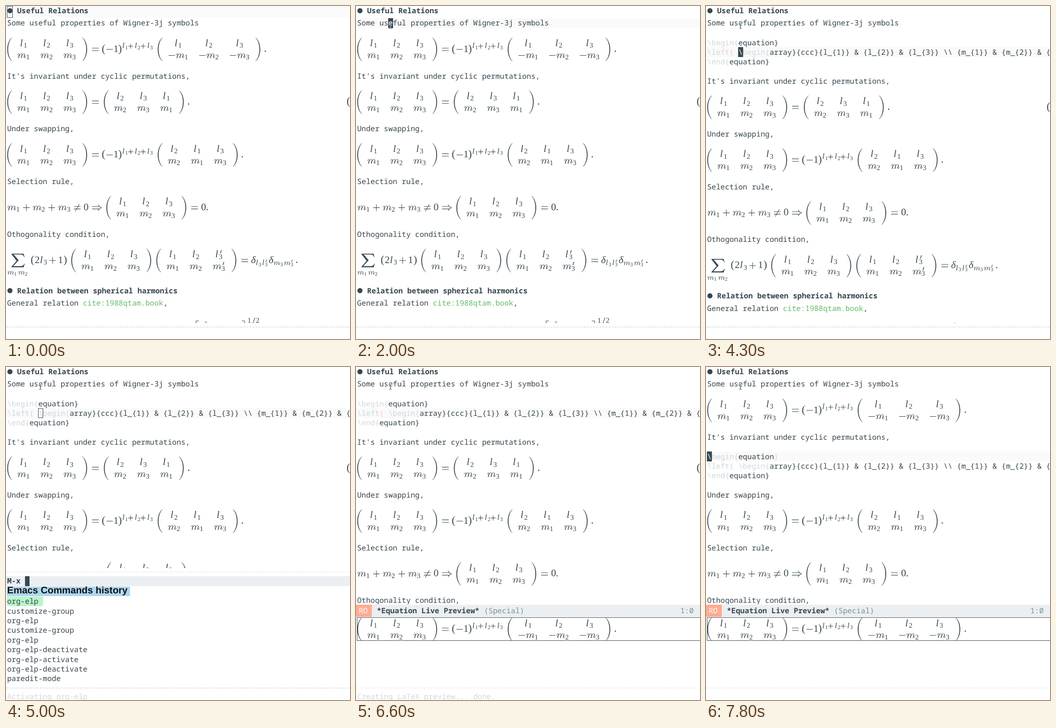
An HTML page that plays this animation: 760x737 px, repeating every 8000 ms.

```html
<!DOCTYPE html>
<html lang="en">
<head>
<meta charset="utf-8">
<title>Equation live preview</title>
<style>
html, body { margin: 0; width: 100%; height: 100%; overflow: hidden; background: #fff; }
svg { display: block; width: 760px; height: 737px; }
text { font: 400 16.43px "Noto Sans Mono", "DejaVu Sans Mono", monospace; fill: #37474f; white-space: pre; text-rendering: geometricPrecision; }
.bold { font-weight: 600; }
.light { font-weight: 300; }
.dim { fill: #cfd8dc; font-weight: 300; }
.grey { fill: #78909c; font-weight: 300; }
.green { fill: #66bb6a; font-weight: 300; }
.match { fill: #ffc4b3; }
.inv { fill: #fff; }
.title { font: 700 21.2px "Liberation Sans", Arial, sans-serif; fill: #111; }
.rm { font-family: "Liberation Serif", "Times New Roman", serif; }
.it { font-family: "Liberation Serif", "Times New Roman", serif; font-style: italic; }
.rule { fill: none; stroke: #37474f; stroke-width: 1.1; }
.m { fill: none; stroke: #37474f; stroke-linecap: round; }
</style>
</head>
<body>
<svg id="stage" viewBox="0 0 760 737"></svg>
<script>
const INK = '#37474f', LOOP = 8000, LEFT = 2.5, ADV = 9.858, LINE = 21.4, GROW = 11.5;
const stage = document.getElementById('stage');

// Basic shapes
const rect = (x, y, w, h, fill) => `<rect x="${x}" y="${y}" width="${w}" height="${h}" fill="${fill}"/>`;
const box = (x, y, w, h) => `<rect class="rule" style="stroke-width:1" x="${x}" y="${y}" width="${w}" height="${h}"/>`;
const line = d => `<path class="rule" d="${d}"/>`;
const shape = d => `<path fill="${INK}" d="${d}"/>`;
const move = (y, body) => `<g transform="translate(0 ${y})">${body}</g>`;
const text = (x, y, s, cls = '') => `<text x="${x}" y="${y}" class="${cls}">${s}</text>`;
const span = (cls, s) => `<tspan class="${cls}">${s}</tspan>`;
// Monospaced line centred on y
const row = (y, s, cls, x = LEFT) => text(x, y + 5.5, s, cls);

// Math parts; y = 0 is the math axis, BASE the baseline
const BASE = 5.5;
const glyph = (cls, size, x, y, s) => `<text class="${cls}" x="${x}" y="${y}" style="font-size:${size}px">${s}</text>`;
const num = (x, s) => glyph('rm', 22, x, BASE, s);
const paren = (x, s) => glyph('rm', 24, x, BASE, s);
const dot = x => `<circle cx="${x}" cy="4.2" r="1.4" fill="${INK}"/>`;
const minus = (x, y = 0) => line(`M${x} ${y}h14`);
const plus = (cx, y = 0, r = 7.3) => line(`M${cx - r} ${y}h${2 * r}M${cx} ${y - r}v${2 * r}`);
const equals = x => line(`M${x} -2.7h15M${x} 2.7h15`);
const prime = (x, y, k = 1) =>
  `<path d="M${x + 2.5 * k} ${y}l${-2.5 * k} ${7 * k}" stroke="${INK}" stroke-width="${1.5 * k}"/>`;

// Wide math italic m: hairlines and heavier stems
const italicM = (x, y, k) => `<g class="m" transform="translate(${x} ${y}) scale(${k})">` +
  '<path stroke-width=".95" d="M.7-6.4C1.4-8.6 2.2-9.4 3.2-9.4S4.8-8.6 4.5-7.2M3.7-4.4C5-7.8 7-9.4 8.8-9.4S11-8.4 10.6-6.6M9.9-4.4C11.2-7.8 13.2-9.4 15-9.4S17.2-8.4 16.6-6.4M15.2-2.2C14.6-.4 15.3-.1 16-.1S17.8-.9 18.6-3.2"/>' +
  '<path stroke-width="1.6" d="M4.5-7.2L2.8-.4M10.6-6.8L9-.4M16.6-6.4L15.2-2"/></g>';

function sym(ch, x, y, sub, k = 1, dash = false) {
  const dx = ch === 'm' ? 19.5 : 8;
  return (ch === 'm' ? italicM(x, y, k) : glyph('it', 22 * k, x, y, ch)) +
    glyph('rm', 15.5 * k, x + dx * k, y + 3.4 * k, sub) +
    (dash ? prime(x + (dx + 3) * k, y - 16 * k, k) : '');
}

// Tall bracket; dir 1 opens right, -1 opens left
function bracket(x, dir) {
  const tip = x + 10 * dir, out = x - 3 * dir, inn = x - 0.7 * dir;
  return shape(`M${tip} -26C${out} -14 ${out} 14 ${tip} 26h${0.8 * dir}C${inn} 14 ${inn} -14 ${tip + 0.8 * dir} -26Z`);
}

function matrix(x, order = [1, 2, 3], { neg = false, dash = false } = {}) {
  const first = neg ? 45 : 36, gap = neg ? 67.7 : 51;
  const cells = order.map((n, i) => {
    const cx = x + first + gap * i, d = dash && i === 2;
    return sym('l', cx - 7.5, -7, n, 1, d) +
      (neg ? minus(cx - 21, 13.5) : '') +
      sym('m', cx - (neg ? 5 : 13.5), 19, n, 1, d);
  });
  return bracket(x, 1) + cells.join('') + bracket(x + (neg ? 227 : 177), -1);
}

const phase = paren(211.5, '(') + minus(222) + num(237.5, '1') + paren(248, ')') +
  [1, 2, 3].map((n, i) => sym('l', 257 + 27.5 * i, -3, n, 0.78)).join('') +
  plus(275.5, -7, 5.3) + plus(303, -7, 5.3);

const flip = matrix(2.5) + equals(190) + phase + matrix(335, [1, 2, 3], { neg: true }) + dot(573);
const cyclic = matrix(2.5) + equals(190) + matrix(216, [2, 3, 1]) + dot(403.5) + paren(752.5, '(');
const swap = matrix(2.5) + equals(190) + phase + matrix(335, [2, 1, 3]) + dot(522);
const select = [1, 2, 3].map((n, i) => sym('m', 3 + 56 * i, BASE, n)).join('') +
  plus(45) + plus(101) + equals(150) + line('M153 8L162 -8') + num(171.5, '0') +
  line('M190 -2.7H207M190 2.7H207M203.5 -7C205 -3 208 -1 211 0C208 1 205 3 203.5 7') +
  matrix(221.5) + equals(409) + num(431, '0') + dot(444.5);
const sum = shape('M12-15H39L41-7H40C39-12 36-13.2 31-13.2H17L28-.5 16 12.5H31C36 12.5 39 11 40.5 7H41.5L39 15H12V14L23.5 .8 12-14Z') +
  sym('m', 3, 31, 1, 0.75) + sym('m', 27, 31, 2, 0.75);
const ortho = sum + paren(54.5, '(') + num(63.5, '2') + sym('l', 75, BASE, 3) + plus(103) +
  num(115, '1') + paren(127, ')') + matrix(144) + matrix(332, [1, 2, 3], { dash: true }) +
  equals(520) + glyph('it', 22, 541.5, BASE, 'δ') + sym('l', 552, 10, 3, 0.75) +
  sym('l', 566, 10, 3, 0.75, true) + glyph('it', 22, 580.5, BASE, 'δ') +
  sym('m', 591, 10, 3, 0.75) + sym('m', 614, 10, 3, 0.75, true) + dot(642.5);
const harmonics = line('M426 697H420V712M521 697H527V712') + glyph('rm', 12, 438, 705.5, '2') +
  glyph('rm', 16, 533.5, 701, '1') + line('M544.5 706L550 689.5') + glyph('rm', 16, 552, 701, '2');

const bullet = (y, fill = INK) => `<circle cx="8.7" cy="${y}" r="5.7" fill="${fill}"/>`;
const heading = (y, s) => bullet(y) + row(y, s, 'bold', 24.5);

// Equation source, three lines from centre y
function source(y, match) {
  const hit = (name, ch) => match === name ? span('match', ch) : ch;
  return row(y, span('dim', '\\begin' + hit('begin', '{')) + 'equation' + hit('begin', '}')) +
    row(y + LINE, span('dim', '\\left' + hit('left', '(') + ' \\begin{') +
      'array}{ccc}{l_{1}} &amp; {l_{2}} &amp; {l_{3}} \\\\ {m_{1}} &amp; {m_{2}} &amp; {') +
    row(y + 2 * LINE, span('dim', '\\end{') + 'equation}');
}

const tail = row(271.7, 'Under swapping,') + move(329.6, swap) +
  row(388.5, 'Selection rule,') + move(446.4, select) +
  row(505.3, 'Othogonality condition,') + move(563.2, ortho) +
  heading(630, 'Relation between spherical harmonics') +
  row(657.5, 'General relation ' + span('green', 'cite:1988qtam.book') + ',') + harmonics;

// Pixel-aligned top and height of the line that holds the cursor
const lineBox = ({ y, ch }) => ch === '●' ? [0, 26] : [Math.floor(y - 10.7), 22];

function cursor(cur) {
  const { col, y, ch, mode } = cur;
  if (mode === 'off') return '';
  const wide = ch === '●', [top, h] = lineBox(cur);
  const x = Math.floor(LEFT - 0.4 + ADV * col), w = wide ? 13 : 11;
  if (mode === 'hollow') return box(x + 0.5, top + 0.5, w - 1, h - 1);
  return rect(x, top, w, h, INK) + (wide ? bullet(y, '#fff') : row(y, ch, 'inv', LEFT + ADV * col));
}

const pointer = ([x, y]) => {
  const d = `M${x - 3} ${y - 6}q3 0 3 2v8q0 2 -3 2M${x + 3} ${y - 6}q-3 0 -3 2v8q0 2 3 2`;
  return `<path d="${d}" fill="none" stroke="#fff" stroke-width="2.4"/><path d="${d}" fill="none" stroke="#455a64"/>`;
};

const dashes = (y, color) =>
  `<path d="M0 ${y}H760" stroke="${color}" stroke-dasharray="5 1.8"/>`;

const commands = ['org-elp', 'customize-group', 'org-elp', 'customize-group', 'org-elp',
  'org-elp-deactivate', 'org-elp-activate', 'org-elp-deactivate', 'paredit-mode'];

function helm(full) {
  const list = rect(2, 486, 272, 21, '#aed6f1') + text(2.5, 501, 'Emacs Commands history', 'title') +
    rect(2, 508, 80, 21, '#b9f6ca') + commands.map((s, i) => row(518.6 + LINE * i, s)).join('');
  return dashes(453.5, '#dde3e5') + rect(0, 463, 760, 22, '#eceff1') + row(473.7, 'M-x', 'bold') +
    rect(42, 463, 10, 22, INK) + (full ? list : '');
}

function preview(full) {
  return rect(0, 526, 760, 27, '#eceff1') + rect(0, 526, 35, 27, '#ffab91') +
    row(539, 'RO', 'inv light', 6) + row(539, '*Equation Live Preview*', 'bold', 46) +
    row(539, '(Special)', 'grey', 283) + row(539, '1:0', 'grey', 716.5) +
    (full ? `<g clip-path="url(#image)">${move(580.5, flip)}</g>` : '') + box(2.5, 554.5, 770, 51);
}

const bodyEnd = { none: 702, helm: 445, preview: 525 };

function draw(s) {
  const { cur, open, pane } = s;
  const shift = open ? GROW : 0;
  const [top, height] = lineBox(cur);
  const body = rect(0, top, 760, height, '#fafafa') +
    heading(10.5, 'Useful Relations') + row(37.8, 'Some useful properties of Wigner-3j symbols') +
    (open === 1 ? source(81, s.match) : move(96, flip)) +
    row(155 + (open === 1 ? GROW : 0), "It's invariant under cyclic permutations,") +
    (open === 2 ? source(198, s.match) : move(212.8 + shift, cyclic)) +
    move(shift, tail) + cursor(cur);
  stage.innerHTML =
    `<defs><clipPath id="body"><rect width="760" height="${bodyEnd[pane]}"/></clipPath>` +
    `<clipPath id="image"><rect x="2" y="555" width="758" height="51"/></clipPath></defs>` +
    rect(0, 0, 760, 737, '#fff') + `<g clip-path="url(#body)">${body}</g>` +
    (pane === 'helm' ? helm(s.full) : pane === 'preview' ? preview(s.full) : '') +
    dashes(710.5, pane === 'preview' ? '#dde3e5' : '#bfd0d2') +
    row(729.5, s.echo, 'dim') + (s.mouse ? pointer(s.mouse) : '');
}

const at = (col, y, ch, mode = 'solid') => ({ cur: { col, y, ch, mode } });
const onBullet = mode => at(0, 10.5, '●', mode);
const onWord = mode => at(7, 37.8, 'e', mode);
const onLeft = mode => at(7, 102.4, '\\', mode);

// Each step changes part of the state
const steps = [
  [0, { ...onBullet('hollow'), open: 0, pane: 'none', full: false, match: '', echo: '', mouse: null }],
  [1000, { ...onBullet('solid'), mouse: [9, 8] }],
  [1100, { mouse: [28, 18] }],
  [1200, { mouse: [50, 34] }],
  [1300, { mouse: [67, 45] }],
  [1400, { mouse: [74, 49.5] }],
  [1600, { mouse: [75, 47] }],
  [1700, { ...onWord('off'), mouse: [76, 44] }],
  [2000, onWord('solid')],
  [3100, { ...onLeft('solid'), open: 1 }],
  [3400, { match: 'left' }],
  [3800, onLeft('off')],
  [4300, onLeft('solid')],
  [4500, { ...onLeft('hollow'), match: '', pane: 'helm' }],
  [4600, { full: true }],
  [5000, { echo: 'Activating org-elp' }],
  [5100, { ...onLeft('solid'), pane: 'none', full: false }],
  [5200, { pane: 'preview' }],
  [5600, { ...onLeft('off'), match: 'left', full: true, echo: 'Creating LaTeX preview... done.' }],
  [6100, onLeft('solid')],
  [6600, onLeft('off')],
  [7100, onLeft('solid')],
  [7200, { ...at(7, 123.8, 'u'), match: '', echo: '' }],
  [7300, { ...at(0, 133.7, ''), open: 0 }],
  [7400, at(7, 155, 'v')],
  [7500, at(0, 176.7, '')],
  [7600, { ...at(0, 198, '\\'), open: 2 }],
  [7800, { match: 'begin' }]
];

let shown = 0;
function tick() {
  const t = performance.now() % LOOP;
  const past = steps.filter(([start]) => start <= t);
  if (past.length !== shown) {
    shown = past.length;
    draw(Object.assign({}, ...past.map(([, change]) => change)));
  }
  requestAnimationFrame(tick);
}
tick();
</script>
</body>
</html>
```
